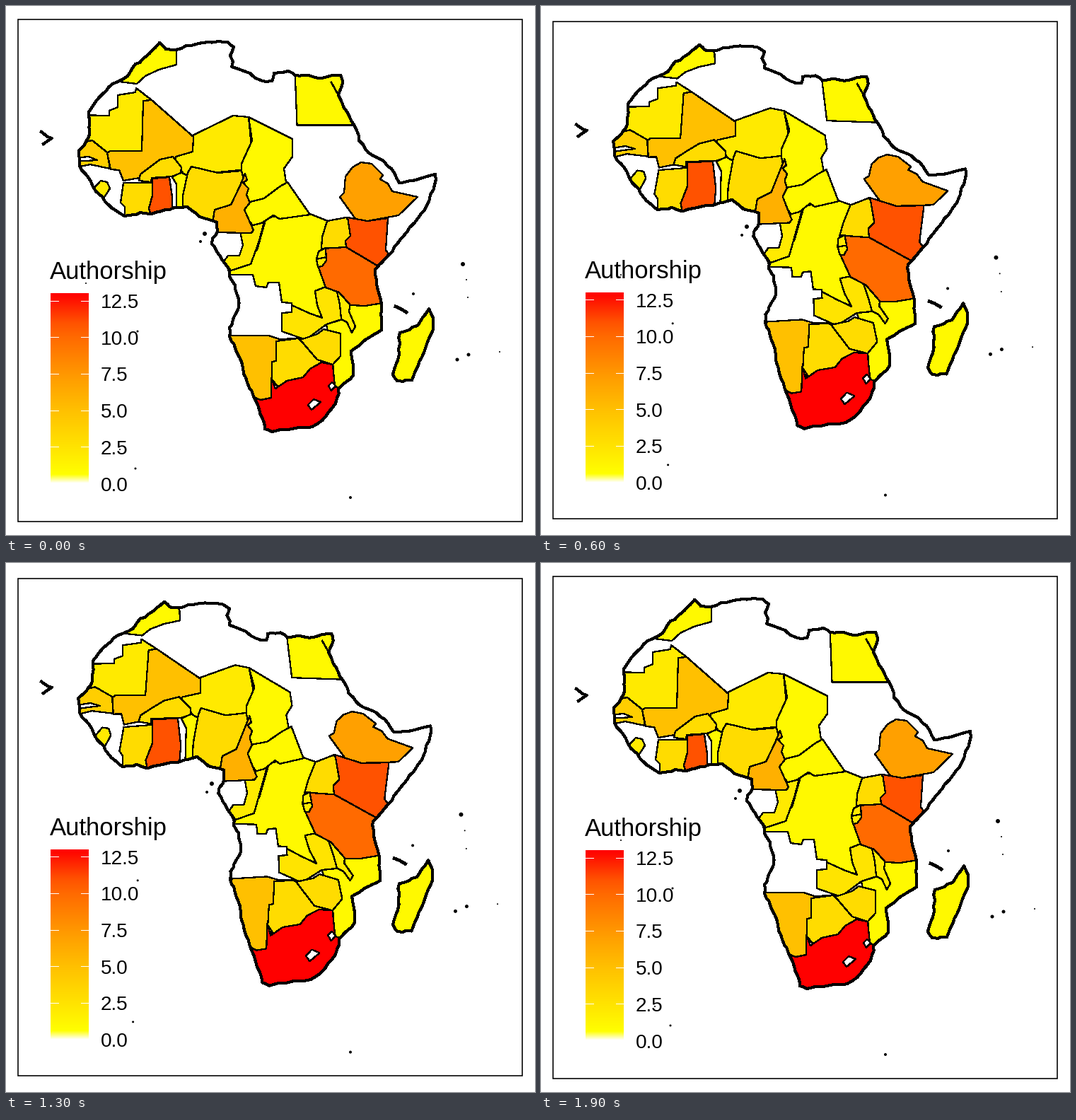
Recreate the animation shown at these times as a matplotlib script. Size 748 px wide and 748 px high, loop 2000 ms.

```python
import numpy as np
import matplotlib.pyplot as plt
from matplotlib.animation import FuncAnimation
from matplotlib.patches import Polygon, Rectangle

SIZE, DPI, FRAMES = 748, 100, 20
PX = 72 / DPI
rng = np.random.default_rng(4)

# Anchors of the rubber-sheet warp: x, y at rest, then x, y fully distorted
NORTH = [
    (217, 52, 225, 55), (313, 51, 306, 60), (318, 85, 314, 87), (409, 98, 395, 106),
    (411, 168, 403, 161), (489, 168, 469, 164), (473, 98, 458, 100), (517, 210, 502, 202),
    (607, 238, 599, 229), (582, 270, 574, 260), (472, 270, 454, 240), (118, 154, 125, 140),
    (103, 205, 102, 189), (143, 208, 152, 187), (206, 133, 215, 120), (192, 205, 198, 184),
    (265, 185, 277, 160), (136, 272, 138, 259), (188, 248, 187, 221), (207, 244, 206, 217),
    (206, 294, 198, 290), (232, 243, 247, 217), (236, 284, 253, 277), (236, 213, 246, 185),
    (254, 237, 272, 212), (333, 232, 341, 207), (345, 278, 348, 254), (405, 188, 401, 182)]
SOUTH = [
    (398, 250, 405, 229), (430, 295, 419, 273), (368, 300, 373, 281), (291, 336, 302, 324),
    (349, 380, 355, 368), (446, 343, 418, 321), (437, 403, 420, 382), (483, 299, 462, 266),
    (540, 300, 542, 279), (481, 341, 461, 325), (526, 367, 524, 358), (487, 423, 478, 417),
    (531, 421, 527, 413), (317, 467, 318, 443), (382, 474, 379, 446), (375, 554, 367, 544),
    (416, 472, 409, 447), (473, 495, 476, 471), (448, 504, 444, 488), (381, 541, 373, 524),
    (372, 601, 368, 596), (470, 541, 471, 530), (598, 428, 597, 419), (550, 527, 550, 516),
    (50, 178, 50, 166), (113, 392, 113, 378), (183, 654, 179, 648), (487, 695, 487, 691),
    (646, 365, 643, 354), (638, 500, 635, 491)]

COAST_NORTH = [
    (217, 52), (226, 61), (240, 62), (255, 56), (277, 52), (313, 51), (322, 58), (317, 70),
    (321, 79), (319, 86), (345, 95), (353, 102), (367, 107), (376, 106), (379, 95), (399, 92),
    (409, 98), (428, 98), (441, 102), (473, 98), (476, 109), (470, 126), (485, 155),
    (496, 176), (499, 190), (512, 207), (530, 217), (545, 230), (556, 250), (575, 247),
    (607, 238), (606, 253), (592, 288), (568, 318), (541, 352)]
COAST_SOUTH = [
    (522, 373), (525, 398), (531, 421), (531, 458), (508, 472), (488, 488), (491, 522),
    (470, 541), (466, 562), (447, 586), (433, 595), (388, 599), (376, 602), (366, 598),
    (363, 584), (350, 552), (336, 520), (333, 503), (316, 467), (316, 455), (329, 426),
    (329, 414), (314, 370), (291, 336), (299, 318), (298, 306)]
COAST_WEST = [
    (274, 298), (256, 284), (238, 285), (206, 294), (190, 292), (168, 297), (150, 286),
    (127, 262), (116, 242), (104, 226), (103, 205), (114, 190), (118, 178), (117, 150),
    (131, 130), (151, 110), (172, 99), (183, 82), (203, 67), (211, 59)]


def shade(value):
    green = np.interp(value, [.6, 2, 5, 7, 10, 11, 13], [255, 234, 192, 160, 106, 82, 0])
    return 1, green / 255, max(0, 1 - value / .6)


ANCHORS = np.array(NORTH + SOUTH, float)
REST, SHIFT = ANCHORS[:, :2], ANCHORS[:, 2:] - ANCHORS[:, :2]


def distances(points):
    return np.linalg.norm(points[:, None] - REST[None], axis=2) / 100


def affine(points):
    return np.column_stack([np.ones(len(points)), points / 100])


count = len(REST)
system = np.zeros((count + 3, count + 3))
system[:count, :count] = -distances(REST) + .01 * np.eye(count)
system[:count, count:] = affine(REST)
system[count:, :count] = affine(REST).T
WEIGHTS = np.linalg.solve(system, np.vstack([SHIFT, np.zeros((3, 2))]))


def displacement(points):
    return np.hstack([-distances(points), affine(points)]) @ WEIGHTS


def roughen(points, step=7, amount=.7):
    """Split each edge of a closed outline into short, slightly jagged pieces."""
    points, pieces = np.array(points, float), []
    for start, end in zip(points, np.roll(points, -1, axis=0)):
        parts = max(1, round(np.hypot(*(end - start)) / step))
        along = np.arange(parts)[:, None] / parts
        jitter = rng.normal(0, amount, (parts, 2))
        jitter[0] = 0
        pieces.append(start + along * (end - start) + jitter)
    return np.vstack(pieces)


fig = plt.figure(figsize=(SIZE / DPI, SIZE / DPI), dpi=DPI, facecolor="white")
ax = fig.add_axes([0, 0, 1, 1])
ax.axis("off")
shapes = []


def add_area(points, fill, width, z):
    points = np.array(points, float)
    area = Polygon(points, closed=True, facecolor=fill, edgecolor="black", lw=width * PX,
                   joinstyle="round", antialiased=False, zorder=z)
    ax.add_patch(area)
    shapes.append((area.set_xy, points, displacement(points)))
    return area


def add_line(width, *points):
    points = np.array(points, float)
    line, = ax.plot(*points.T, color="black", lw=width * PX, antialiased=False, zorder=4)
    shapes.append((lambda xy: line.set_data(*xy.T), points, displacement(points)))


coast = add_area(roughen(COAST_NORTH + COAST_SOUTH + COAST_WEST), "none", 3, 3)


def country(value, *points):
    add_area(points, shade(value), 1.2, 2).set_clip_path(coast)


# Later countries overlap earlier ones, so each shared border is detailed once
country(1, (150, 40), (241, 40), (241, 83), (216, 90), (197, 99), (185, 110), (160, 107))
country(1, (408, 90), (490, 90), (490, 168), (411, 168))
country(2, (262, 184), (321, 155), (343, 157), (350, 230), (252, 240), (236, 210))
country(1, (368, 299), (430, 294), (460, 306), (447, 440), (404, 430), (404, 420), (390, 419),
        (386, 391), (371, 391), (368, 398), (353, 396), (349, 380), (310, 380), (355, 345))
country(1, (343, 157), (405, 188), (405, 213), (393, 230), (398, 262), (335, 285), (333, 223),
        (348, 190))
country(1, (398, 249), (416, 275), (430, 295), (387, 301), (378, 296), (363, 306), (350, 311),
        (330, 290), (345, 277), (365, 272), (386, 256))
country(2, (331, 319), (349, 310), (365, 306), (357, 335), (346, 365), (318, 374), (308, 361),
        (314, 353), (330, 353), (335, 338))
country(1, (247, 235), (257, 240), (255, 292), (241, 292), (241, 252), (235, 242))
country(3, (262, 227), (300, 236), (333, 233), (340, 262), (300, 310), (250, 290), (250, 268),
        (257, 236))
country(6, (338, 237), (341, 246), (335, 250), (343, 258), (340, 267), (345, 278), (337, 288),
        (350, 317), (347, 321), (290, 320), (295, 288), (318, 281), (331, 254))
country(2, (100, 154), (146, 155), (146, 148), (158, 143), (158, 126), (183, 122), (184, 116),
        (206, 133), (205, 215), (100, 205))
country(5, (194, 134), (206, 133), (265, 185), (264, 206), (240, 213), (235, 235), (166, 247),
        (160, 232), (148, 231), (143, 208), (147, 205), (192, 205))
country(4, (95, 205), (112, 192), (122, 190), (143, 207), (147, 230), (119, 224), (95, 229))
country(0, (95, 215), (117, 213), (129, 218), (95, 220))
country(2, (120, 262), (134, 247), (143, 249), (147, 258), (136, 275))
country(3, (166, 250), (207, 250), (210, 300), (168, 302), (168, 284), (162, 278))
country(3, (236, 213), (248, 228), (247, 236), (235, 241), (206, 243), (205, 249), (188, 247),
        (190, 238), (203, 228), (218, 217))
country(11, (207, 244), (231, 242), (235, 270), (235, 296), (206, 299), (202, 286), (207, 268))
country(7, (480, 241), (490, 228), (502, 221), (517, 223), (533, 239), (529, 245), (540, 251),
        (546, 262), (582, 270), (555, 296), (511, 304), (494, 301), (472, 270), (478, 264))
country(3, (454, 304), (481, 299), (492, 312), (487, 345), (446, 343), (447, 327))
country(11, (483, 299), (511, 304), (540, 300), (537, 345), (548, 360), (530, 380), (481, 341),
        (480, 332), (487, 325))
country(1, (475, 418), (545, 410), (550, 480), (500, 545), (464, 540), (462, 500), (453, 450),
        (473, 444))
country(2.4, (390, 434), (404, 433), (404, 423), (428, 434), (447, 441), (440, 423), (437, 403),
        (452, 397), (475, 405), (475, 443), (453, 450), (424, 472), (390, 460))
country(2, (468, 404), (480, 408), (487, 420), (485, 432), (494, 453), (489, 462), (482, 447),
        (474, 443), (472, 422))
country(10, (446, 343), (481, 341), (545, 379), (545, 418), (508, 424), (487, 423), (471, 405),
        (452, 398), (442, 370))
country(2, (442, 347), (452, 342), (453, 360), (447, 368), (441, 369), (439, 358))
country(5, (305, 466), (371, 466), (387, 471), (414, 470), (395, 485), (375, 556), (365, 558),
        (340, 555))
country(3, (382, 474), (413, 470), (455, 504), (420, 530), (390, 545), (376, 528), (376, 503),
        (382, 502))
country(3, (416, 472), (425, 469), (440, 464), (449, 457), (473, 463), (473, 495), (462, 507),
        (440, 500))
country(13, (340, 549), (360, 557), (375, 554), (375, 526), (381, 541), (397, 530), (420, 525),
        (430, 513), (446, 504), (462, 507), (465, 538), (490, 545), (480, 620), (340, 620))
country(0, (456, 537), (461, 532), (466, 537), (460, 544))
country(0, (427, 564), (435, 556), (445, 560), (432, 571))
add_area(roughen([(598, 428), (604, 441), (604, 457), (574, 529), (553, 530), (547, 521),
                  (556, 492), (557, 462), (582, 452)]), shade(1), 3, 3)

add_line(1.2, (439, 358), (453, 355))
add_line(1.5, (470, 126), (460, 108))
add_line(3, (50, 178), (59, 185), (65, 187), (60, 190), (53, 195))
add_line(3.5, (551, 425), (558, 428), (566, 433))

# Islets: x, y, diameter
islets = np.array([
    (281, 322, 6), (275, 333, 4), (113, 392, 2), (186, 460, 3), (161, 627, 2), (183, 654, 3),
    (487, 695, 4), (646, 365, 6), (653, 412, 2), (576, 407, 4), (638, 500, 5), (654, 493, 5),
    (698, 489, 2), (651, 387, 2)], float)
dots = ax.scatter(islets[:, 0], islets[:, 1], s=(islets[:, 2] * PX) ** 2, color="black",
                  lw=0, zorder=4)
shapes.append((dots.set_offsets, islets[:, :2], displacement(islets[:, :2])))
border = Rectangle((17, 18.5), 713.5, 710, fill=False, lw=1.6 * PX, zorder=5)
ax.add_patch(border)

# Legend
BAR_TOP, BAR_BOTTOM, UNIT = 406, 675, 20.68
ramp = np.array([[shade(v)] for v in np.linspace(13, 0, 269)])
bar = ax.imshow(ramp, extent=(63, 117, BAR_BOTTOM, BAR_TOP), aspect="auto",
                interpolation="nearest", zorder=6)
legend = [(ax.text(61.5, 386, "Authorship", family="Liberation Sans", size=34.8 * PX,
                   zorder=7), 386)]
ticks = []
for value in np.arange(0, 13, 2.5):
    y = BAR_BOTTOM - value * UNIT
    label = ax.text(133.5, y + 10.5, f"{value:.1f}", family="Liberation Sans",
                    size=28 * PX, zorder=7)
    legend.append((label, y + 10.5))
    if value:
        for x in (63, 106):
            tick, = ax.plot([x, x + 11], [y, y], color="white", lw=PX, zorder=7)
            ticks.append((tick, y))


def update(frame):
    step = min(frame, FRAMES - 1 - frame)
    amount = (1 - np.exp(-.22 * step)) / (1 - np.exp(-.22 * 9))
    for place, points, move in shapes:
        place(points + amount * move)
    border.set_y(18.5 + 4.5 * amount)
    border.set_height(710 - 9 * amount)
    lift = 1.6 * amount
    bar.set_extent((63, 117, BAR_BOTTOM - lift, BAR_TOP - lift))
    for text, y in legend:
        text.set_y(y - lift)
    for tick, y in ticks:
        tick.set_ydata([y - lift] * 2)
    ax.set_xlim(0, SIZE)
    ax.set_ylim(SIZE, 0)


anim = FuncAnimation(fig, update, frames=FRAMES, interval=100, repeat=True, repeat_delay=0)
plt.show()
```
